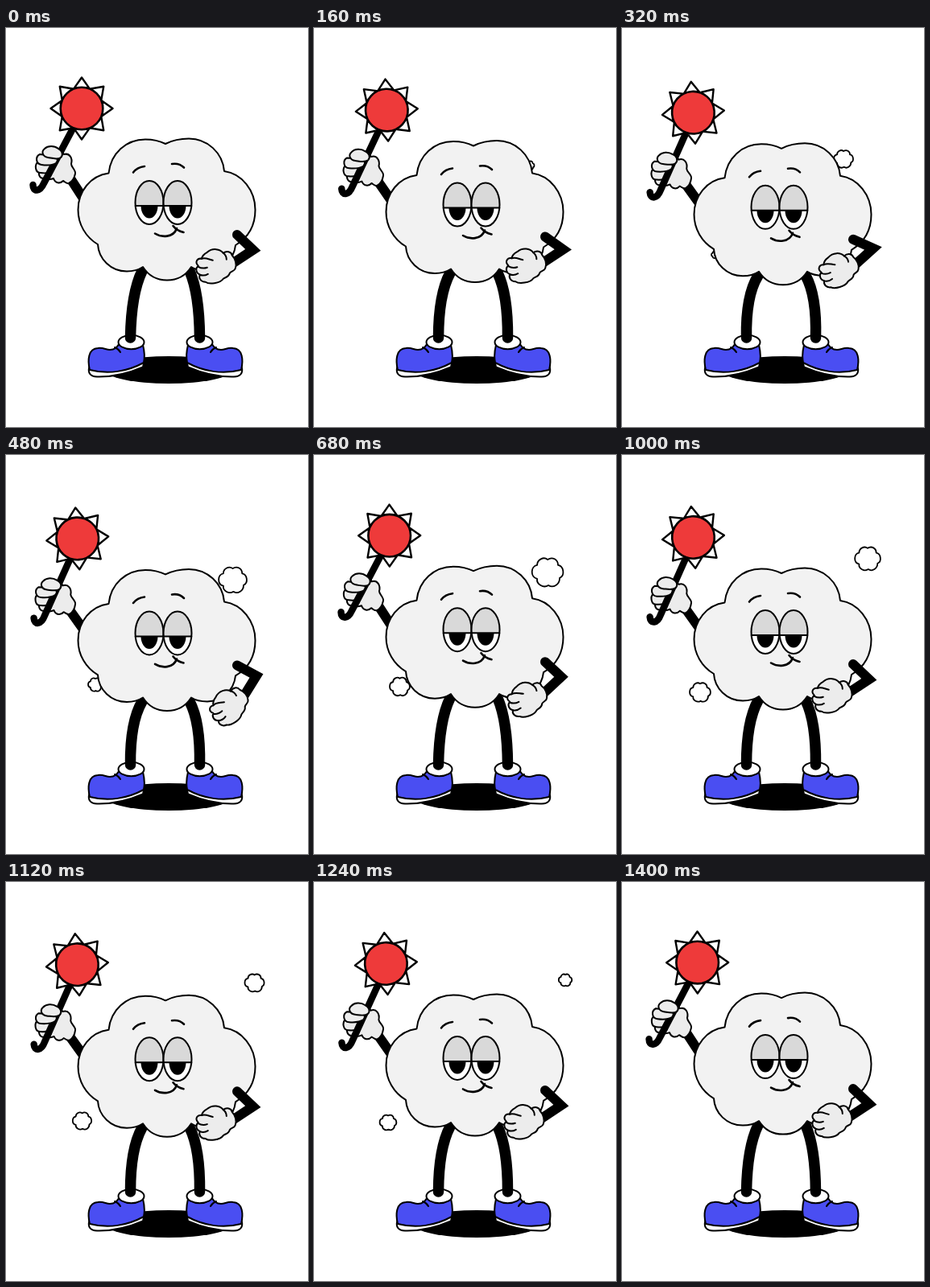
Recreate the animation shown at these times as an HTML page. Size 375x496 px, loop 1.44 s.

```html
<!DOCTYPE html>
<html lang="en">
<head>
<meta charset="utf-8">
<title>Cloud with a sun wand</title>
<style>
html, body { margin: 0; width: 100%; height: 100%; overflow: hidden; background: #fff; }
svg { display: block; width: 100vw; height: 100vh; }
.ink { fill: none; stroke: #000; stroke-width: 2; stroke-linecap: round; stroke-linejoin: round; }
.limb { fill: none; stroke: #000; stroke-width: 12; stroke-linecap: round; }
.pale { fill: #f2f2f2; }
.glove { fill: #ececec; }
.white { fill: #fff; }
.blue { fill: #4a4ef2; }
.red { fill: #ee3a3a; }
.lid { fill: #d9d9d9; }
</style>
</head>
<body>
<svg viewBox="0 0 375 496">
  <defs>
    <path id="blob" d="M-13 -9 C-13 -16 -5 -20 0 -16 C6 -20 13 -16 13 -9 C20 -8 22 4 15 7 C15 15 7 20 1 16 C-5 20 -14 15 -13 8 C-22 6 -21 -8 -13 -9Z"/>
    <g id="shoe">
      <path class="ink white" d="M103.500 421 C101 429 105 433 113 433.500 C134 434 155 428 170 421.500 L172 412Z"/>
      <path class="ink blue" d="M104 425 C101 413 102 398.500 114 398 C121 397 124 400 129 400 C136 400 138 396 141 392 C150 400 162 400 170 394 C172 402 172.500 409 171 416 C151 427 127 431 104 425Z"/>
      <path class="ink" d="M135 397 Q140 399 142 403"/>
      <ellipse class="ink white" cx="155.500" cy="390.500" rx="16" ry="8.800"/>
    </g>
    <g id="eye">
      <ellipse class="white" rx="17.5" ry="27"/>
      <path class="lid" d="M-17.3 4 A17.5 27 0 1 1 17.3 4Z"/>
      <path d="M-10.5 4 A10.5 15.5 0 0 0 10.5 4Z"/>
      <path class="ink" d="M-17.3 4 H17.3"/>
      <ellipse class="ink" rx="17.5" ry="27"/>
    </g>
  </defs>

  <ellipse cx="202" cy="425" rx="79" ry="17"/>
  <use href="#shoe"/>
  <use href="#shoe" transform="matrix(-1 0 0 1 396 0)"/>
  <path id="legs" class="limb" style="stroke-width:13.5"/>

  <use id="puffR" href="#blob" class="ink white"/>
  <use id="puffL" href="#blob" class="ink white"/>
  <path id="armL" class="limb"/>

  <g id="body">
    <path class="ink pale" d="M127.500 180.500 C130 156 149 138.500 173 138.500 C183 138.500 191 140.500 198 144 C206 140 216 137.500 227 137.500 C250 137.500 269 155 271 178 C293 181 309.500 202 309.500 226 C309.500 246 300 261 285 270 C283 289 267 302 250 302 C242 302 236 301 230 297 C223 308 212 313.500 200 313.500 C188 313.500 177 308 170 297 C164 301 158 302.500 150 302.500 C130 302.500 115 287 114 269 C99 260 89.500 244 89.500 226 C89.500 203 105 183.500 127.500 180.500Z"/>
    <use href="#eye" x="178" y="217"/>
    <use href="#eye" x="213" y="217"/>
    <path class="ink" style="stroke-width:2.600" d="M158 179.500 Q163 173 172 172 M206 169 Q215 167.500 221 173.500 M185 255.500 C193 260.500 208 261 212 249 M207.500 246 Q212 252 220.500 254"/>
  </g>

  <g id="wand">
    <path class="ink glove" d="M56 152 C64 149 70 153 72 157 C79 155 83 162 81 169 C81 173 87 177 86 181 C85 186 82 191 78 193 C75 194 73 191 71 190 C67 194 61 193 59 187 C52 190 45 186 42 180Z"/>
    <path class="ink glove" d="M43 177 C39 180 41 187 47 187 C53 188 57 184 56 178Z"/>
    <path class="ink glove" d="M40 166 C35 170 36 180 43 180 C50 181 55 180 58 177 C61 172 59 167 55 166Z"/>
    <path class="ink" style="stroke-width:8.5" d="M83 125 L47 193 C42 204 33.500 204 33.500 195"/>
    <path class="ink glove" d="M42 157 C36 160 37 169 44 170 C51 171 57 171 62 168 C66 164 63 160 59 159Z"/>
    <path class="ink glove" d="M48 150 C43 154 46 160 52 161 C58 162 64 164 68 161 C72 157 69 152 65 150 C60 146 52 146 48 150Z"/>
    <g id="sun" class="ink white" transform="translate(94 100)"></g>
  </g>

  <path id="armR" class="limb" style="stroke-linejoin:miter"/>
  <g id="handR">
    <path class="ink glove" d="M250 279 C257 273 266 275 270 280 C274 277 280 278 281 283 C285 287 287 294 285 299 C284 303 280 302 278 305 C277 310 272 310 270 312 C266 318 252 319 248 316 C242 316 239 311 241 307 C236 305 235 299 239 296 C234 291 238 286 243 287 C244 283 246 281 250 279Z"/>
    <path class="ink" d="M243 287 C248 285 252 288 257 289 M239 297 Q244 300 250 298 M241 307 Q246 309 251 306 M270 280 Q274 283 274 288"/>
  </g>
</svg>
<script>
const LOOP = 1440, HALF = LOOP / 2;
const $ = id => document.getElementById(id);
const set = (id, name, value) => $(id).setAttribute(name, value);

// Rises from 0 to 1 and falls back between two times
const bump = (t, from, to) =>
  t <= from || t >= to ? 0 : (1 - Math.cos(2 * Math.PI * (t - from) / (to - from))) / 2;

const polar = (r, deg) => [r * Math.cos(deg * Math.PI / 180), r * Math.sin(deg * Math.PI / 180)];

// Linear track through [time, x, y, radius] keys
function track(keys, t) {
  const i = Math.max(1, keys.findIndex(k => k[0] >= t));
  const a = keys[i - 1], b = keys[i];
  const u = (t - a[0]) / (b[0] - a[0]);
  return a.map((v, n) => v + (b[n] - v) * u);
}

const puffs = {
  puffR: [[0, 260, 179, 0], [320, 275, 163, 12], [480, 281.5, 155.5, 17.5], [680, 290, 146, 19.5],
    [1000, 305, 129, 16], [1240, 312, 122, 8.3], [1390, 315, 119, 0], [LOOP, 315, 119, 0]],
  puffL: [[0, 125, 274, 0], [320, 115.5, 282, 4.5], [480, 111, 285.5, 9], [680, 106.5, 288, 12.5],
    [1000, 97, 295, 13], [1240, 92, 299, 10.5], [1395, 89, 301, 0], [LOOP, 89, 301, 0]]
};

function buildSun() {
  let d = '';
  for (let a = 0; a < 360; a += 45) {
    const pts = [polar(27, a - 20), polar(38.5, a), polar(27, a + 20)];
    d += 'M' + pts.map(p => p.map(v => v.toFixed(2)).join(' ')).join('L') + 'Z';
  }
  $('sun').innerHTML = `<path style="stroke-width:2.4" d="${d}"/><circle class="red" r="26.3" style="stroke-width:2.6"/>`;
}

function draw(t) {
  const p = bump(t % HALF, 0, HALF);
  const q = p * (2 - p);
  const bob = p * (t < HALF ? 6 : 3.4);
  set('body', 'transform', `translate(0 ${bob})`);

  const hip = 302 + bob, bend = 330 + bob / 2, out = bob / 3;
  set('legs', 'd', `M169 ${hip} Q${155.5 - out} ${bend} 154.5 385 M228 ${hip} Q${240 + out} ${bend} 240.5 385`);

  const lift = bob + 1.6 * q;
  set('wand', 'transform', `translate(${-0.5 * q} ${lift}) rotate(${-4 * q} 60 172)`);
  set('armL', 'd', `M98 ${215 + bob} L${78 - q} ${184 + lift}`);

  const swing = -25 * bump(t, 200, 810);
  const [ux, uy] = polar(27.3, 43.5 - 20 * bump(t, 0, HALF));
  const ex = 287 + ux, ey = 257 + bob + uy;
  const [fx, fy] = polar(28, 146.5 + swing);
  set('armR', 'd', `M287 ${257 + bob} L${ex} ${ey} L${ex + fx} ${ey + fy}`);
  set('handR', 'transform', `translate(${ex} ${ey}) rotate(${swing}) translate(-307 -276)`);

  for (const id in puffs) {
    const [, x, y, r] = track(puffs[id], t);
    const k = r / 19.5;
    $(id).style.display = k > 0.02 ? '' : 'none';
    set(id, 'transform', `translate(${x} ${y}) scale(${k})`);
    $(id).style.strokeWidth = 1.8 / Math.max(k, 0.1);
  }
}

buildSun();
const start = performance.now();
function tick(now) {
  draw(Math.max(0, now - start) % LOOP);
  requestAnimationFrame(tick);
}
draw(0);
requestAnimationFrame(tick);
</script>
</body>
</html>
```
